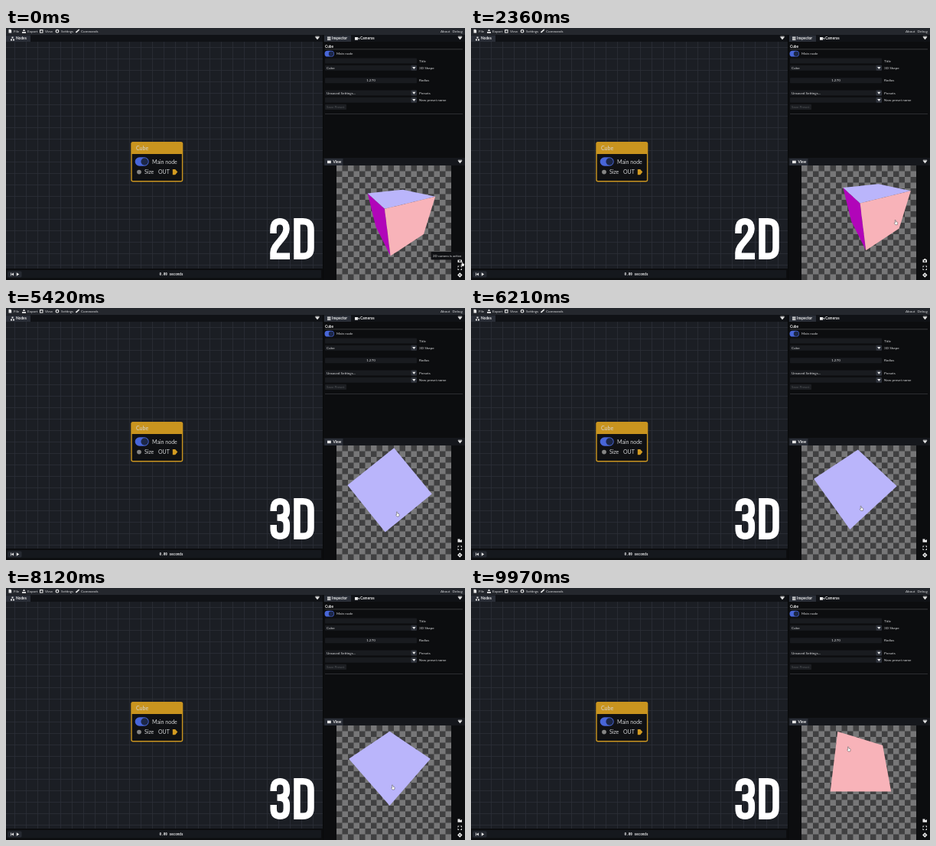
Recreate the animation shown at these times as an HTML page. Size 600 by 330 pixels, loop 10000 ms.

```html
<!DOCTYPE html>
<html lang="en">
<head>
<meta charset="utf-8">
<title>Node editor</title>
<style>
  html, body { margin: 0; width: 100%; height: 100%; overflow: hidden; background: #0c0d0f; }
  svg { display: block; width: 600px; height: 330px; }
  text { font: 4.6px Lato, sans-serif; fill: #d6d7d9; }
  .bold { font-size: 4.8px; font-weight: 700; fill: #eee; }
  .node { font-size: 7px; }
  .clock { font: 700 4.3px "Noto Sans Mono", monospace; }
  .field { fill: #191b1f; }
  .icon { fill: #e8e8e8; }
  .lettering path { fill: none; stroke: #fff; stroke-width: 8.5; }
</style>
</head>
<body>
<svg viewBox="0 0 600 330">
  <defs>
    <pattern id="grid" x="11" y="25" width="15" height="15" patternUnits="userSpaceOnUse">
      <path d="M0 .5H15M.5 0V15" stroke="#2b2f37" stroke-width=".8"/>
    </pattern>
    <pattern id="checker" x="432" y="180" width="15" height="15" patternUnits="userSpaceOnUse">
      <rect width="15" height="15" fill="#404041"/>
      <path d="M0 0H7.5V15H15V7.5H0Z" fill="#777778"/>
    </pattern>
    <clipPath id="viewport"><rect x="432" y="180" width="150" height="150"/></clipPath>
    <g id="toggle">
      <rect width="18" height="11.4" rx="5.7" fill="#4866d8"/>
      <circle cx="12.4" cy="5.7" r="4.7" fill="#1c2747"/>
    </g>
    <path id="menu" d="M-2.6-1.8H2.6L0 1.6ZM-2.6-2.6H2.6" fill="#e8e8e8" stroke="#e8e8e8" stroke-width=".5"/>
  </defs>

  <!-- node canvas -->
  <rect y="18" width="414" height="298" fill="#1b1e24"/>
  <rect y="18" width="414" height="298" fill="url(#grid)"/>

  <!-- bars and tabs -->
  <rect width="600" height="9" fill="#24272d"/>
  <rect y="9" width="414" height="9" fill="#101216"/>
  <rect y="9.5" width="32" height="8.5" fill="#2a2e37"/>
  <rect y="315" width="414" height="15" fill="#0c0d0f"/>
  <rect x="1" y="317" width="411" height="10.5" rx="1" fill="#15181d"/>
  <rect x="2.500" y="318.500" width="18" height="8" rx="1.500" fill="#262a32"/>
  <rect x="414" y="9" width="186" height="9" fill="#101216"/>
  <rect x="416" y="9.5" width="35" height="8.5" fill="#2a2e37"/>
  <rect x="415" y="170" width="185" height="10" fill="#15171c"/>
  <rect x="416.500" y="171" width="24" height="9" fill="#2a2e37"/>
  <path d="M414.500 9V330" stroke="#08090a"/>
  <use href="#menu" x="407" y="13.500"/>
  <use href="#menu" x="593.500" y="13.500"/>
  <use href="#menu" x="593.500" y="175.500"/>

  <!-- icons -->
  <g class="icon">
    <path d="M3.500 1.800H6L7.200 3V6.600H3.500Z"/>
    <path d="M21 5H26V6.800H21ZM23.500 1.500L25.300 4H21.700Z"/>
    <path d="M44 2H48.500V6.500H44ZM45 3.200V5.600H47.500V3.200Z" fill-rule="evenodd"/>
    <path d="M92 6.500L90.800 5.300L94.800 1.800L96 1.600L95.800 3Z"/>
    <path d="M6 14.500H8V16.500H6ZM9 14.500H11V16.500H9ZM7.500 11.500H9.500V13.500H7.500Z"/>
    <path d="M420 11.600H424.500V12.700H420ZM420 13.300H424.500V14.400H420ZM420 15H424.500V16.100H420Z"/>
    <path d="M456 12H460V15.800H456ZM460.300 13.500L462 12.400V15.400Z"/>
    <path d="M420 173.700H424.800V177.200H420Z"/>
    <path d="M6.200 320.500H7V324.500H6.200ZM10 320.500V324.500L7 322.500ZM13.800 320.300V324.700L17.200 322.500Z"/>
  </g>
  <circle cx="67" cy="4.200" r="1.800" fill="none" stroke="#e8e8e8" stroke-width="1.200"/>
  <g id="labels"></g>

  <!-- inspector -->
  <path d="M417 27.800H597" stroke="#55575b" stroke-width=".6"/>
  <path d="M417 112.500H597" stroke="#3a3c40" stroke-width=".7"/>
  <use href="#toggle" transform="translate(416.500 29.700) scale(.69)"/>
  <g id="fields"></g>

  <!-- node -->
  <rect x="164" y="149.700" width="66.600" height="51" rx="2" fill="#101114" stroke="#c9941f" stroke-width="1.400"/>
  <path d="M164 165V151.500Q164 149.500 166 149.500H228.500Q230.600 149.500 230.600 151.500V165Z" fill="#c9941f"/>
  <use href="#toggle" x="168.700" y="169.300"/>
  <circle cx="174" cy="188.600" r="2.900" fill="#858585"/>
  <path d="M217.800 185H221.200L224.300 188.600L221.200 192.200H217.800Z" fill="#d39b21"/>
  <g id="nodeText"></g>

  <!-- viewport -->
  <rect x="432" y="180" width="150" height="150" fill="url(#checker)"/>
  <g clip-path="url(#viewport)" id="cube"></g>
  <g class="icon">
    <path id="stillIcon" d="M590.500 303.200H592L592.700 302H594L594.700 303.200H596V307H590.500ZM593.300 304A1.100 1.100 0 1 0 593.310 304Z" fill-rule="evenodd"/>
    <path id="videoIcon" d="M590.500 302.500H593.500V304H594.500L596 303V306.800H590.500Z"/>
    <path d="M590.500 311.500H592.700L590.500 313.700ZM596 311.500V313.700L593.800 311.500ZM590.500 317V314.800L592.700 317ZM596 317H593.800L596 314.800Z"/>
    <path d="M593.300 320.300L596.500 323.500L593.300 326.700L590.100 323.500ZM593.300 322.500L592.300 323.500L593.300 324.500L594.300 323.500Z" fill-rule="evenodd"/>
  </g>
  <g id="tooltip">
    <rect x="555.500" y="293" width="44" height="10.500" rx="1" fill="#101114"/>
    <text id="tip" x="558" y="299.800" style="font-size:4.350px"></text>
  </g>

  <!-- big caption -->
  <g class="lettering">
    <path id="two" d="M349.500 269V263C349.500 256 353 253.300 358 253.300S366.500 256 366.500 263C366.500 275 349.500 283 349.500 294V298.700H371"/>
    <path id="three" d="M349.700 266V263C349.700 256 353 253.300 358.200 253.300S366.800 256 366.800 263V266C366.800 272 363 274.600 354.500 274.600C363 274.600 366.800 277 366.800 284V289C366.800 296 363.500 298.700 358.200 298.700S349.700 296 349.700 289V284"/>
    <path d="M380.500 253.300H388C395 253.300 398.500 256.500 398.500 264V288C398.500 295.500 395 298.700 388 298.700H380.500Z"/>
  </g>

  <path id="cursor" d="M-1.500-3Q-.6-3.600-.3-2.500L0-.8L1.600-.5Q2.300-.2 2.100.8L1.600 3H-1L-2.400.9Q-2.200 0-1.200.5Z" fill="#fff" stroke="#222" stroke-width=".4"/>
</svg>
<script>
const LOOP = 10000;
const FOCAL = 80, DISTANCE = 3.04, CENTER = [512.5, 245.5];
const GRAB = [542, 262];
const $ = id => document.getElementById(id);

function add(parent, tag, attrs, content = '') {
  const el = document.createElementNS('http://www.w3.org/2000/svg', tag);
  for (const key in attrs) el.setAttribute(key, attrs[key]);
  el.textContent = content;
  return parent.appendChild(el);
}
const label = (parent, x, y, content, attrs = {}) => add(parent, 'text', { x, y, ...attrs }, content);

// Static interface
const labels = $('labels'), fields = $('fields'), nodeText = $('nodeText');
[[10, 'File'], [28, 'Export'], [51, 'View'], [72, 'Settings'], [98, 'Commands'], [568, 'About'], [583.5, 'Debug']]
  .forEach(([x, name]) => label(labels, x, 5.9, name));
[[13, 15.3, 'Nodes'], [426, 15.3, 'Inspector'], [463, 15.3, 'Cameras'], [427.5, 177, 'View'], [417, 25.7, 'Cube']]
  .forEach(([x, y, name]) => label(labels, x, y, name, { class: 'bold' }));
label(labels, 216, 324.3, '0.00 seconds', { class: 'clock', 'text-anchor': 'middle' });

label(fields, 432, 35.2, 'Main node');
[[39.5, 'Title', '', false], [48.7, '3D Shape', 'Cube', true], [65.3, 'Radius', '', false],
 [81.6, 'Presets', 'Unsaved Settings...', true], [90.7, 'New preset name', '', true]]
  .forEach(([y, name, value, dropdown]) => {
    add(fields, 'rect', { x: 417, y, width: 120, height: 7, rx: 1, class: 'field' });
    if (dropdown) {
      add(fields, 'rect', { x: 529.5, y, width: 7.5, height: 7, rx: 1, fill: '#30343d' });
      add(fields, 'path', { d: `M531.2 ${y + 2.2}h4.2l-2.1 3z`, fill: '#eee' });
    }
    label(fields, 419, y + 5, value);
    label(fields, 540, y + 5, name);
  });
label(fields, 477, 70.3, '1.270', { 'text-anchor': 'middle' });
add(fields, 'rect', { x: 417, y: 99.8, width: 28, height: 7.2, rx: 1, fill: '#1c1e22' });
label(fields, 419, 105, 'Save Preset', { style: 'fill:#55575b' });

[[170, 160.3, 'Cube'], [191, 177.8, 'Main node'], [181, 191.2, 'Size'], [199, 191.2, 'OUT']]
  .forEach(([x, y, name]) => label(nodeText, x, y, name, { class: 'node' }));

// Motion: rows of [time, a, b]
const panKeys = [[1250, 0, 0], [1700, -47, 22], [2050, -30, 4], [2450, 20, -9], [2950, -11, -7]];
const orbitKeys = [[5080, 33, 31], [5420, 39, 89], [5900, 39, 89], [6400, 40, 68], [7000, 25.5, 39.5],
  [7600, 40, 86], [8120, 45, 67], [8800, 32, 60], [9400, 24, 20], [9970, 20, -19]];
const cursorKeys = [[820, 597, 309], [1250, ...GRAB],
  [2950, GRAB[0] - 11, GRAB[1] - 7], [3420, 592, 308], [4860, 592, 308], [5080, 508, 235],
  [5420, 512, 270], [5900, 512, 270], [6400, 510, 259], [7000, 505, 242], [7600, 506, 271],
  [8120, 506, 261], [8800, 502, 257], [9400, 496, 233], [9970, 494, 211]];

function sample(keys, t) {
  const i = keys.findIndex(key => key[0] > t);
  if (i === 0) return keys[0].slice(1);
  if (i < 0) return keys[keys.length - 1].slice(1);
  const [from, to] = [keys[i - 1], keys[i]];
  const s = (t - from[0]) / (to[0] - from[0]);
  const eased = s * s * (3 - 2 * s);
  return [1, 2].map(k => from[k] + (to[k] - from[k]) * eased);
}
const ramp = (t, start, end) => Math.min(1, Math.max(0, (t - start) / (end - start)));

// Cube faces: axis, side, colour, corners
const faces = [
  [0, -1, '#b105b9', [[-1, 1, -1], [-1, 1, 1], [-1, -1, 1], [-1, -1, -1]]],
  [1, 1, '#bab5fb', [[-1, 1, -1], [1, 1, -1], [1, 1, 1], [-1, 1, 1]]],
  [2, 1, '#f8b3b9', [[-1, 1, 1], [1, 1, 1], [1, -1, 1], [-1, -1, 1]]]
].map(([axis, side, fill, corners]) => ({ axis, side, corners, el: add($('cube'), 'polygon', { fill }) }));

function drawCube([yaw, pitch], [panX, panY]) {
  const a = yaw * Math.PI / 180, p = pitch * Math.PI / 180;
  const [sa, ca, sp, cp] = [Math.sin(a), Math.cos(a), Math.sin(p), Math.cos(p)];
  const eye = [-sa * cp, sp, ca * cp].map(v => v * DISTANCE);
  const project = ([x, y, z]) => {
    const right = x * ca + z * sa, toward = z * ca - x * sa;
    const scale = FOCAL / (DISTANCE - toward * cp - y * sp);
    return [CENTER[0] + panX + right * scale, CENTER[1] + panY - (y * cp - toward * sp) * scale];
  };
  for (const { axis, side, corners, el } of faces) {
    el.style.display = eye[axis] * side > 1 ? '' : 'none';
    el.setAttribute('points', corners.map(c => project(c).map(v => v.toFixed(2))).join(' '));
  }
}

function render(t) {
  const pan = sample(panKeys, t);
  drawCube(sample(orbitKeys, t), pan);
  const dragging = t > 1250 && t < 2950;
  const [x, y] = dragging ? [GRAB[0] + pan[0], GRAB[1] + pan[1]] : sample(cursorKeys, t);
  $('cursor').setAttribute('transform', `translate(${x.toFixed(2)} ${y.toFixed(2)})`);

  const orbiting = t >= 3600;
  $('tip').textContent = `${orbiting ? 3 : 2}D camera is active`;
  const hovering = t < 960 || (t > 3380 && t < 4920);
  $('tooltip').style.display = hovering ? '' : 'none';
  $('stillIcon').style.display = orbiting ? 'none' : '';
  $('videoIcon').style.display = orbiting ? '' : 'none';
  $('two').style.opacity = 1 - ramp(t, 3650, 3850);
  $('three').style.opacity = ramp(t, 3600, 3760);
}

const start = performance.now();
function tick() {
  render((performance.now() - start) % LOOP);
  requestAnimationFrame(tick);
}
tick();
</script>
</body>
</html>
```
